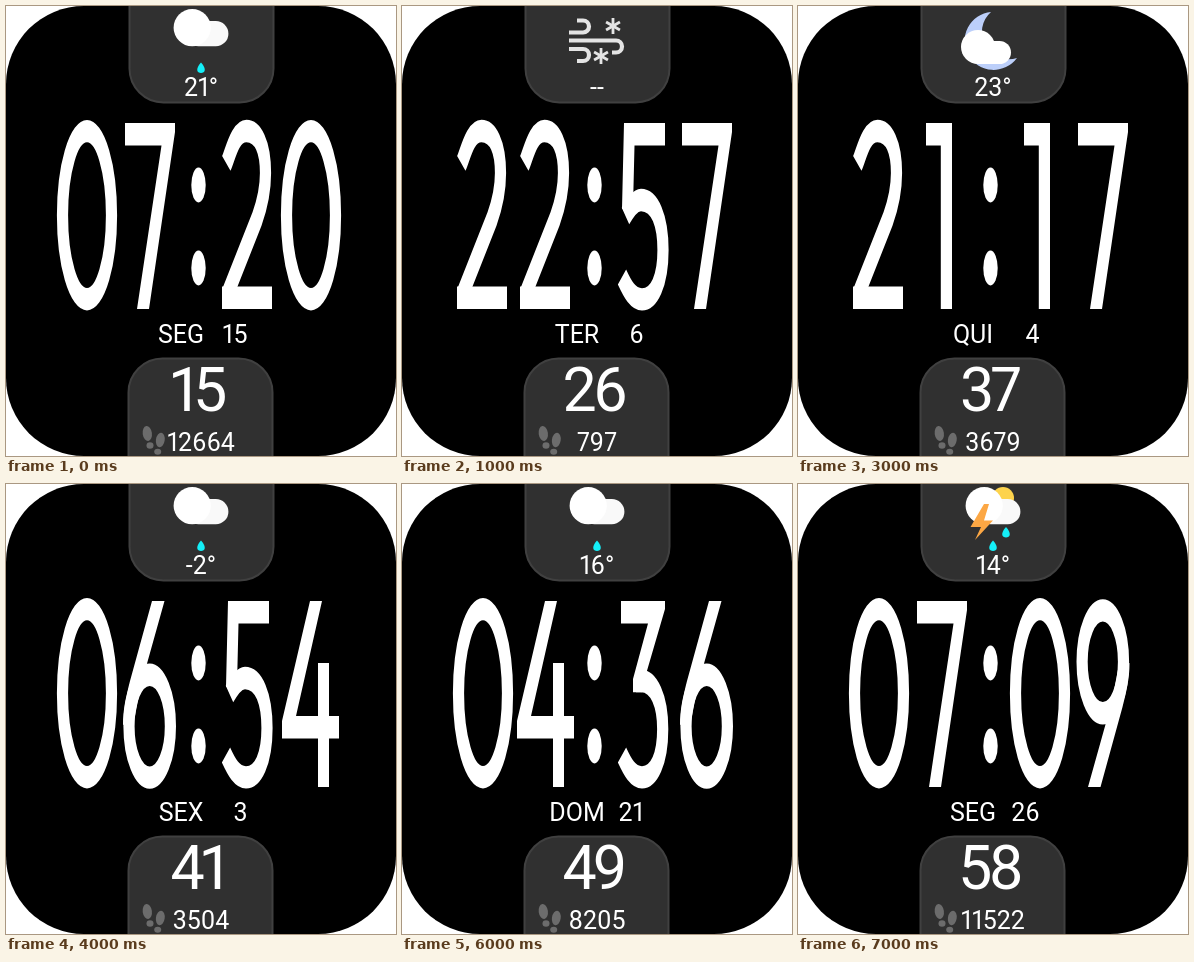
Animation of 390 by 450 pixels, one loop 8000 ms. Source, as an HTML page:

```html
<!DOCTYPE html>
<html lang="pt">
<head>
<meta charset="utf-8">
<title>Watch face</title>
<style>
  html, body { margin: 0; width: 100%; height: 100%; overflow: hidden; background: #fff; }
  svg { display: block; }
  text { font: 25px Roboto, sans-serif; font-variant-numeric: proportional-nums; fill: #fff; text-anchor: middle; }
  #number { font-size: 61px; letter-spacing: -4px; }
  #date { text-anchor: end; }
  .panel { fill: #303030; stroke: #404040; stroke-width: 2; }
</style>
</head>
<body>
<svg width="390" height="450" viewBox="0 0 390 450">
  <rect width="390" height="450" rx="78"/>
  <rect class="panel" x="123.5" y="-60" width="144" height="156.5" rx="34"/>
  <rect class="panel" x="122.5" y="352.5" width="144" height="160" rx="34"/>
  <g fill="#6c6c6c">
    <ellipse cx="141.3" cy="427.5" rx="4.6" ry="7.5" transform="rotate(-8 141.3 427.5)"/>
    <ellipse cx="144" cy="439.5" rx="3.5" ry="3.2"/>
    <ellipse cx="154.3" cy="434" rx="4.4" ry="7.3" transform="rotate(8 154.3 434)"/>
    <ellipse cx="151.7" cy="445.8" rx="3.5" ry="3"/>
  </g>
  <g fill="#fff">
    <ellipse cx="192.5" cy="179" rx="7.2" ry="17.5"/>
    <ellipse cx="192.5" cy="262" rx="7.2" ry="17.5"/>
  </g>
  <g id="clock"></g>
  <g id="icon"></g>
  <text id="temp" x="195" y="90"></text>
  <text id="day" x="175" y="337"></text>
  <text id="date" x="241.5" y="337"></text>
  <text id="number" x="191" y="405"></text>
  <text id="steps" x="195" y="445"></text>
</svg>
<script>
const $ = id => document.getElementById(id);

// Each digit: [filled part, stroked part]; drawn at half height and stretched vertically.
const SIX = ['M32 0H44.5L21 42L14 60L3 62C3 54 6 48 10 40Z',
             'M9 62.6a20.7 25.7 0 1 1 41.4 0a20.7 25.7 0 1 1-41.4 0'];
const GLYPHS = {
  0: ['', 'M5.5 46.1a24.5 42 0 1 1 49 0a24.5 42 0 1 1-49 0'],
  1: ['M14 0H40V93H28.8V11.2H14Z', ''],
  2: ['M4 81.8H54V93H4Z', 'M8.3 20.2C12.5 15.5 17 4 28.5 4C40 4 47.5 12 47.5 25C47.5 33 44 41 39 48L9 86'],
  3: ['M7 0H51V4L30 40L28 45.6H19V39L34 11.2H7Z',
      'M22 40H27C40 40 48.7 50 48.7 64C48.7 79 40 88.2 28 88.2C19 88.2 13.5 83 8 77'],
  4: ['M29 0H41L15 57.5H37V31H48V57.5H58V68.7H48V93H37V68.7H1V60Z', ''],
  5: ['M10 0H51V11.2H20.5L19 42L8 43Z',
      'M11.5 46.5C16 42.5 21 38.5 27 38.5C41 38.5 49 49 49 63.5C49 79 40 88.2 28 88.2C19 88.2 13.5 83 8 77'],
  6: SIX,
  7: ['M5 0H55V4.5L29 93H17L41.5 11.2H5Z', ''],
  9: SIX
};
const SLOTS = [51, 114, 212, 275];

function digit(d, i) {
  const [solid, line] = GLYPHS[d];
  const turn = d === '9' ? 'rotate(180 29.75 46.5)' : '';
  return `<g transform="translate(${SLOTS[i]} 117) scale(1 2) ${turn}">
    <path d="${solid}" fill="#fff"/>
    <path d="${line}" fill="none" stroke="#fff" stroke-width="11.2"/></g>`;
}

const drop = (x, y) =>
  `<path d="M${x} ${y - 5.5}C${x + 6} ${y + 1} ${x + 4} ${y + 5} ${x} ${y + 5}S${x - 6} ${y + 1} ${x} ${y - 5.5}" fill="#14eff8"/>`;

const flake = (x, y) => [0, 60, 120].map(a =>
  `<path d="M${x} ${y - 8}v16" transform="rotate(${a} ${x} ${y})" stroke-width="2.8"/>`).join('');

const cloud = `<rect x="180" y="15" width="42.4" height="25.3" rx="12.6" fill="#f9f9f9"/>
  <circle cx="186.2" cy="21.7" r="18.6" fill="#fff"/>`;

const ICONS = {
  drizzle: cloud + drop(195, 62),
  rain: cloud + [182, 195, 208].map(x => drop(x, 48.5) + drop(x, 62)).join(''),
  storm: `<circle cx="205" cy="14" r="11" fill="#fdd34c"/>${cloud}
    <path d="M186 20L172.5 43H183L177 56L195 36.5H186L191 20Z" fill="#fca744"/>` + drop(208, 48.5) + drop(195, 62),
  snow: `<g fill="none" stroke="#e4e4e4" stroke-width="4.2">
    <path d="M167 26.5H181a6 6 0 0 0 0-12h-6M167 34.5H214a6 6 0 0 1 0 12h-4M167 43H181a6 6 0 0 1 0 12h-6"/>
    ${flake(211, 20)}${flake(199, 50)}</g>`,
  night: `<path d="M193 6A29 29 0 1 0 219 52A27 27 0 0 1 193 6" fill="#bccffa"/>
    <circle cx="180" cy="41" r="17" fill="#fff"/><rect x="172" y="35" width="41" height="23" rx="11.5" fill="#fff"/>`
};

const STATES = [
  ['0720', 'drizzle', '21°', 'SEG', 15, 15, 12664],
  ['2257', 'snow', '--', 'TER', 6, 26, 797],
  ['1317', 'drizzle', '18°', 'QUA', 12, 32, 2638],
  ['2117', 'night', '23°', 'QUI', 4, 37, 3679],
  ['0654', 'drizzle', '-2°', 'SEX', 3, 41, 3504],
  ['1130', 'rain', '20°', 'SÁB', 15, 27, 5683],
  ['0436', 'drizzle', '16°', 'DOM', 21, 49, 8205],
  ['0709', 'storm', '14°', 'SEG', 26, 58, 11522]
];

let shown = -1;
function draw(now) {
  const index = Math.floor(now / 1000) % STATES.length;
  if (index !== shown) {
    shown = index;
    const [time, icon, ...labels] = STATES[index];
    $('clock').innerHTML = [...time].map(digit).join('');
    $('icon').innerHTML = ICONS[icon];
    ['temp', 'day', 'date', 'number', 'steps'].forEach((id, i) => $(id).textContent = labels[i]);
  }
  requestAnimationFrame(draw);
}
draw(performance.now());
</script>
</body>
</html>
```
